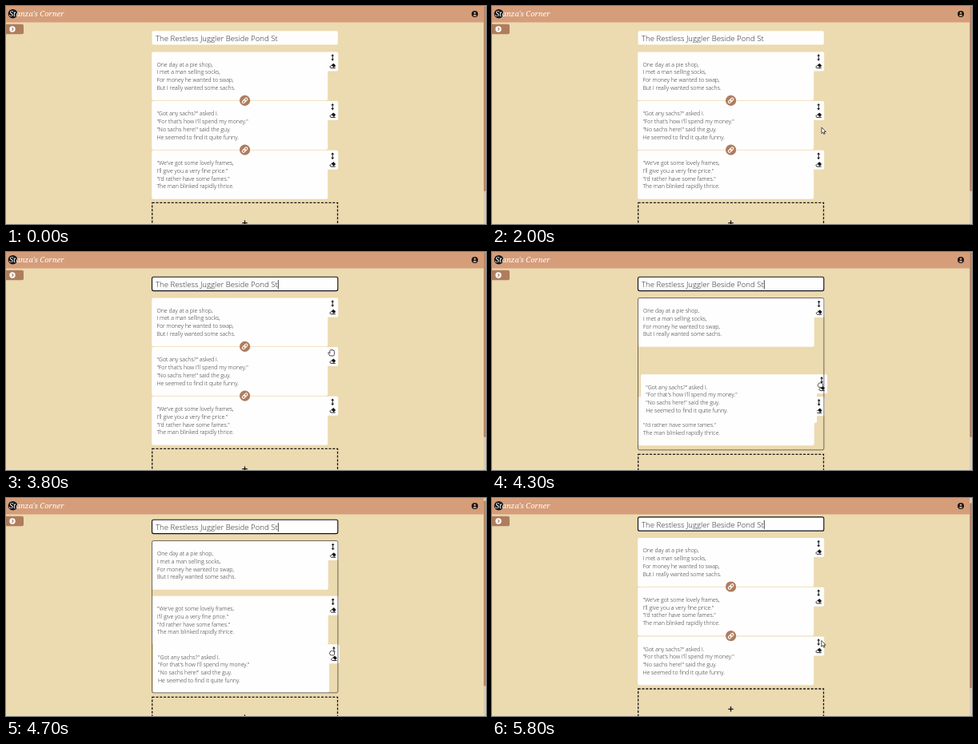
An HTML page that plays this animation: 600 px wide and 273 px high, repeating every 5900 ms.

```html
<!DOCTYPE html>
<html lang="en">
<head>
<meta charset="utf-8">
<title>Verse editor</title>
<style>
  html, body { margin: 0; width: 100%; height: 100%; overflow: hidden; background: #ecdab0; }
  svg { display: block; width: 600px; height: 273px; }
  text { font-family: "Open Sans", "Noto Sans", sans-serif; font-weight: 300; fill: #262626; white-space: pre; }
  .title { font-size: 9.6px; }
  .line { font-size: 7px; }
  .brand { font: italic 400 9.4px "Noto Serif", "Liberation Serif", serif; fill: #fff; }
  .paper { fill: #fffefe; }
  .brown { fill: #ae7d5e; }
  .ink { fill: #161616; }
  .stroke { fill: none; stroke: #161616; }
  .white { fill: none; stroke: #fff; stroke-linecap: round; stroke-linejoin: round; }
  .pointer { fill: #fff; stroke: #222; stroke-width: .8; stroke-linejoin: round; }
</style>
</head>
<body>
<svg viewBox="0 0 600 273">
  <defs>
    <g id="tools">
      <path class="paper" d="M219 0h12a2 2 0 0 1 2 2v20a2 2 0 0 1-2 2h-12z"/>
      <path class="ink" d="M226 2.8l1.900 2.400h-1.400v3.800h1.400l-1.900 2.400-1.900-2.400h1.400v-3.800h-1.400z"/>
      <g transform="translate(226 17.6)">
        <path class="ink" d="M-1.6-.7L.5-2.8Q1-3.3 1.6-2.8L3.5-.9Q4-.3 3.5.2L1.6 2z"/>
        <path class="stroke" stroke-width=".9" d="M-1.5-.6L-3.3 1Q-3.6 1.3-3.3 1.6l1.1 1.1H3.6M1.5 1.9L.7 2.7"/>
      </g>
    </g>
    <g id="link">
      <circle r="6.6" class="brown"/>
      <g class="white" stroke-width="1.1" transform="rotate(-45)">
        <rect x="-4" y="-1.5" width="4.6" height="3" rx="1.5"/>
        <rect x="-.6" y="-1.5" width="4.6" height="3" rx="1.5"/>
      </g>
    </g>
  </defs>

  <rect width="600" height="273" fill="#ecdab0"/>
  <g id="page">
    <rect id="field" class="paper" x="182.5" y="31.2" width="232.3" height="17.4" rx="2"/>
    <text id="title" class="title" x="187" y="44">The Restless Juggler Beside Pond St</text>
    <path id="caret" class="stroke" stroke-width=".8" d="M0 35.2v11"/>
    <g id="cards"></g>
    <rect id="frame" class="stroke" stroke-width=".7" stroke-opacity=".85" x="182.5" y="57.6" width="232.4" height="190.3" rx="2"/>
    <g id="links">
      <use href="#link" x="298.6" y="118.4"/>
      <use href="#link" x="298.6" y="180.1"/>
    </g>
    <g id="adder">
      <rect class="stroke" stroke-width="1.3" stroke-dasharray="3 1.8" x="182.7" y="246.4" width="231.8" height="52"/>
      <path class="stroke" stroke-width="1.3" d="M295.3 271.7h6.4M298.5 268.5v6.4"/>
    </g>
  </g>

  <rect y="20" width="600" height="1" fill="#dfbd95"/>
  <rect width="600" height="20" fill="#d59d7a"/>
  <circle cx="8.5" cy="9.7" r="5.8" class="ink"/>
  <text class="brand" x="4" y="13">Stanza's Corner</text>
  <g transform="translate(586 10)">
    <circle r="4" class="ink"/>
    <circle cy="-1.2" r="1.3" fill="#d59d7a"/>
    <path fill="#d59d7a" d="M-2.4 2Q0-.4 2.4 2Q0 4-2.4 2z"/>
  </g>
  <path class="brown" d="M0 22.7h20a2 2 0 0 1 2 2v8.6a2 2 0 0 1-2 2H0z"/>
  <circle cx="8" cy="29" r="3.7" fill="#fff"/>
  <path d="M7.3 27.2l1.8 1.8-1.8 1.8" fill="none" stroke="#ae7d5e" stroke-width="1.1"/>
  <rect x="597" width="3" height="273" fill="#d8cbb4"/>
  <rect id="thumb" x="597.3" y="0" width="2.4" height="232" rx="1.2" fill="#b27f60"/>

  <g id="mouse">
    <path id="arrow" class="pointer" d="M0 0V7.6L1.8 6l1.1 2.6 1.3-.6L3.1 5.5H5.4z"/>
    <path id="open" class="pointer" d="M-2.2 4.2L-4.2 .8Q-4.3-.5-3-.1L-2.1 .9V-2.5Q-1.5-3.7-.8-2.6Q-.3-4.4 .6-2.9Q1.5-3.9 2-2.3Q3.4-2.9 3.4-1.3V1.6Q3.4 3 2.5 4.2z"/>
    <path id="fist" class="pointer" d="M-1.9 3.4L-3.2 1.2Q-3.4 0-2.3-.2V-1.4Q-1.7-2.5-.9-1.7Q-.2-2.6 .5-1.8Q1.3-2.4 1.8-1.5Q3-1.7 3-.4V1.6Q3 2.6 2.3 3.4z"/>
  </g>
</svg>

<script>
const LOOP = 5900, STEP = 100;
const TOP = 57.4, PITCH = 61.7;
const FOCUS = 3800, GRAB = 3900, RELEASE = 5000, SETTLE = 5300;

const verses = [
  ["One day at a pie shop,", "I met a man selling socks,", "For money he wanted to swap,", "But I really wanted some sachs."],
  ["\"Got any sachs?\" asked I.", "\"For that's how I'll spend my money.\"", "\"No sachs here!\" said the guy.", "He seemed to find it quite funny."],
  ["\"We've got some lovely frames,", "I'll give you a very fine price.\"", "\"I'd rather have some fames.\"", "The man blinked rapidly thrice."]
];

// Each key: time, then the values reached at that time.
const mousePath = [
  [1400, 384, 280], [1800, 396, 154], [2000, 412, 152], [2400, 423, 140],
  [2900, 414.5, 119], [3100, 413, 120], [3400, 407, 125], [GRAB, 407, 126],
  [4300, 410.4, 166], [4700, 407.6, 193.5], [4900, 408, 193], [5100, 407.5, 192],
  [5500, 408, 190], [5800, 411.8, 178.5]
];
const dragPath = [[GRAB, 0, 0], [4300, 3.4, 33.7], [4700, 1.2, 67.6], [4900, 1, 67.6], [5100, 0, 61.2]];
const swapPath = [[4350, 0], [4600, -54.5]];
const scrollPath = [[4500, 0], [4700, -4], [4900, -7.4]];

const $ = id => document.getElementById(id);
const show = (el, on) => el.setAttribute("visibility", on ? "visible" : "hidden");
const move = (el, x, y) => el.setAttribute("transform", `translate(${x} ${y})`);

function make(tag, attrs, parent) {
  const el = document.createElementNS("http://www.w3.org/2000/svg", tag);
  for (const k in attrs) el.setAttribute(k, attrs[k]);
  return parent.appendChild(el);
}

function along(path, t) {
  if (t <= path[0][0]) return path[0].slice(1);
  for (let i = 1; i < path.length; i++) {
    const a = path[i - 1], b = path[i];
    if (t <= b[0]) {
      const k = (t - a[0]) / (b[0] - a[0]);
      return a.slice(1).map((v, j) => v + (b[j + 1] - v) * k);
    }
  }
  return path[path.length - 1].slice(1);
}

function makeCard(lines) {
  const card = make("g", {}, $("cards"));
  make("rect", { class: "paper", width: 220, height: 60.9, rx: 2 }, card);
  make("use", { href: "#tools" }, card);
  lines.forEach((s, i) => {
    make("text", { class: "line", x: 6.2, y: 18.4 + i * 9.7 }, card).textContent = s;
  });
  return card;
}

const [first, second, third] = verses.map(makeCard);
$("cards").append(first, third, second);

function draw(t) {
  const dragging = t >= GRAB && t < SETTLE;
  const settled = t >= SETTLE;
  const focused = t >= FOCUS;
  const edge = dragging ? 0.5 : 0;
  const [scroll] = along(scrollPath, t);
  const [dx, dy] = settled ? [0, PITCH] : along(dragPath, t);
  const swap = settled ? -PITCH : along(swapPath, t)[0];
  const x = 182.2 + edge, y = TOP + edge;

  move($("page"), 0, scroll);
  move(first, x, y);
  move(second, x + dx, y + PITCH + dy);
  move(third, x, y + 2 * PITCH + swap);
  show($("frame"), dragging);
  show($("links"), !dragging);
  move($("adder"), 0, dragging ? 7 : 0);

  $("field").style.stroke = focused ? "#12121c" : "none";
  $("field").style.strokeWidth = 1.15;
  show($("caret"), focused && !(t >= 5000 && t < 5500));
  move($("thumb"), 0, -scroll * 0.85);

  move($("mouse"), ...along(mousePath, t));
  const held = t >= GRAB && t < RELEASE;
  const hover = t >= 3200 && t < GRAB;
  show($("arrow"), t >= 1400 && !held && !hover);
  show($("open"), hover);
  show($("fist"), held);
}

move($("caret"), 187.7 + $("title").getComputedTextLength(), 0);

const start = performance.now();
function tick() {
  const t = (performance.now() - start) % LOOP;
  draw(Math.floor(t / STEP) * STEP);
  requestAnimationFrame(tick);
}
tick();
</script>
</body>
</html>
```
